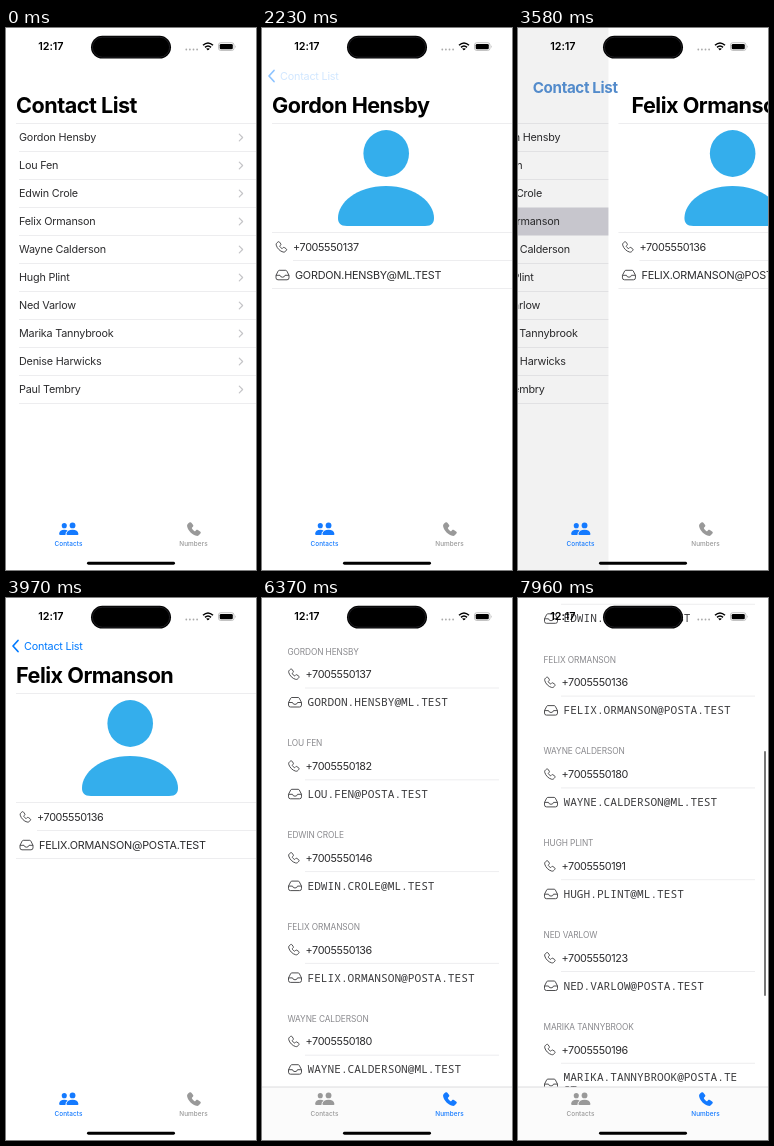
These frames come from a looping animation (250 by 542 pixels, 8 s). An HTML page:

```html
<!DOCTYPE html>
<html lang="en">
<head>
<meta charset="utf-8">
<title>Contacts</title>
<style>
  html, body { margin: 0; width: 100%; height: 100%; overflow: hidden; background: #fff; }
  svg { display: block; width: 100%; height: 100%; }
  text { font: 10.8px Inter, "Liberation Sans", sans-serif; letter-spacing: -.2px; fill: #2c2c2e; white-space: pre; }
  .large { font-size: 21.6px; font-weight: 700; letter-spacing: -.5px; fill: #000; }
  .phone { letter-spacing: -.35px; }
  .mono { font: 300 11.15px "Noto Sans Mono", "DejaVu Sans Mono", monospace; letter-spacing: 0; fill: #3c3c3e; }
  .head { font-size: 8.3px; letter-spacing: -.1px; fill: #8a8a8e; }
  .tab text { font-size: 6.4px; font-weight: 500; letter-spacing: .05px; text-anchor: middle; fill: inherit; }
  .clock { font-weight: 600; letter-spacing: -.1px; fill: #000; }
  .back { fill: #007aff; }
  .line { stroke: #e9e9eb; stroke-width: .8; }
  .icon { fill: none; stroke: #3c3c3e; stroke-width: .9; stroke-linejoin: round; }
  .arrow { fill: none; stroke-linecap: round; stroke-linejoin: round; }
</style>
</head>
<body>
<svg id="stage" viewBox="0 0 250 542"></svg>
<script>
const LOOP = 8000, STEP = 48.13, PITCH = 91.8, ROW = 28;
const BLUE = '#147aff', GRAY = '#999';

// name, last two digits of the phone number, mail domain
const contacts = [
  ['Gordon Hensby', 37, 'ML.TEST'], ['Lou Fen', 82, 'POSTA.TEST'],
  ['Edwin Crole', 46, 'ML.TEST'], ['Felix Ormanson', 36, 'POSTA.TEST'],
  ['Wayne Calderson', 80, 'ML.TEST'], ['Hugh Plint', 91, 'ML.TEST'],
  ['Ned Varlow', 23, 'POSTA.TEST'], ['Marika Tannybrook', 96, 'POSTA.TEST'],
  ['Denise Harwicks', 64, 'ML.TEST'], ['Paul Tembry', 58, 'ML.TEST']
].map(([name, end, domain]) => ({
  name,
  phone: '+70055501' + end,
  mail: name.toUpperCase().replace(' ', '.') + '@' + domain
}));

// times at which a row is tapped and its page moves in and out
const visits = [
  { row: 0, tap: 495, push: 592, press: 2225, pop: 2490 },
  { row: 3, tap: 3380, push: 3463, press: 4680, pop: 4990 }
];
const TAB_SWITCH = 6365, SCROLL_START = 7335, SCROLL_END = 7960;

const handset = 'M3.2.8C4 .1 4.9.3 5.4 1.1L6.9 3.3C7.3 4 7.2 4.5 6.7 5L5.9 5.8C5.5 6.2 5.6 6.5 5.9 7C6.4 7.7 7.3 8.6 8 9.1C8.5 9.4 8.8 9.5 9.2 9.1L10 8.3C10.5 7.8 11 7.7 11.7 8.1L13.9 9.6C14.7 10.1 14.9 11 14.2 11.8C13.2 13.2 12 14.6 10 14C6 13 2 9 1 5C.4 3 1.8 1.8 3.2.8Z';
const tray = 'M0 5.5L2.2 1.2Q2.6.5 3.4.5H9.6Q10.4.5 10.8 1.2L13 5.5V8Q13 10 11 10H2Q0 10 0 8ZH4Q4.4 7.4 6.5 7.4T9 5.5H13';

const text = (x, y, s, cls = '', id = '') => `<text x="${x}" y="${y}" class="${cls}" id="${id}">${s}</text>`;
const line = (x, y, end = 250) => `<path class="line" d="M${x} ${y}H${end}"/>`;
const phoneIcon = (x, y) =>
  `<path class="icon" style="stroke-width:1.2" transform="translate(${x} ${y - 5.6}) scale(.76)" d="${handset}"/>`;
const trayIcon = (x, y) => `<path class="icon" transform="translate(${x} ${y - 5.2})" d="${tray}"/>`;

const listRow = ({ name }, i) => {
  const y = 109.5 + ROW * i;
  return text(13, y + 3.9, name) + line(13, y + 14) +
    `<path class="arrow" stroke="#c4c4c7" stroke-width="1.2" d="M233.3 ${y - 3.3}l3.3 3.3-3.3 3.3"/>`;
};

const section = ({ name, phone, mail }, i) => {
  const wrapped = mail.length > 26;
  return `<g transform="translate(0 ${PITCH * i})">` +
    text(25.5, 56.5, name.toUpperCase(), 'head') +
    phoneIcon(26, 76.3) + text(43.5, 80.3, phone, 'phone') +
    line(43, 90, 237) +
    trayIcon(26.5, wrapped ? 110.5 : 104.2) +
    text(45.5, 108.2, mail.slice(0, 26), 'mono') +
    (wrapped ? text(45.5, 121.2, mail.slice(26), 'mono') : '') + '</g>';
};

stage.innerHTML = `
  <g id="list">
    <rect width="250" height="542" fill="#fff"/>
    <rect id="highlight" y="95.5" width="250" height="28" fill="#d2d1d8"/>
    ${line(10, 95.5)}${contacts.map(listRow).join('')}
    <rect id="dim" width="250" height="542" fill="#001"/>
  </g>
  <g id="detail">
    <rect width="250" height="542" fill="#fff"/>
    ${line(10, 95.5)}${line(10, 204.5)}${line(31, 232.5)}${line(10, 260.5)}
    <g fill="#34aeec">
      <ellipse cx="124.2" cy="125.5" rx="22.8" ry="23.4"/>
      <path d="M85 198C78 198 76 194.5 76 190C76 175 94 158 124 158S172 175 172 190C172 194.5 170 198 163 198Z"/>
    </g>
    ${phoneIcon(13.5, 219)}${text(31, 223, '', 'phone', 'phone')}
    ${trayIcon(14, 247)}${text(33, 251, '', '', 'mail')}
  </g>
  <g id="nav">
    ${text(0, 0, 'Contact List', 'large', 'listTitle')}
    ${text(0, 0, 'Contact List', 'back', 'backLabel')}
    <path id="backArrow" class="arrow" stroke="#007aff" stroke-width="1.7" d="M12 42.5l-5 5.5 5 5.5"/>
    ${text(0, 84.8, '', 'large', 'detailTitle')}
  </g>
  <g id="numbers">
    <rect width="250" height="542" fill="#fff"/>
    <g id="sections">${contacts.map(section).join('')}</g>
    <rect id="scrollbar" x="246" width="2" height="245" rx="1" fill="#777"/>
    <rect y="489" width="250" height="53" fill="#fbfbfb"/>
    <path d="M0 489H250" stroke="#d4d4d6" stroke-width=".8"/>
  </g>
  <g class="tab" id="contactsTab">
    <g transform="translate(62.7 501.2) scale(.94) translate(-62.7 -501.2)">
      <circle cx="58" cy="497.4" r="2.7"/><circle cx="66.8" cy="497.2" r="3.1"/>
      <path d="M53.8 507.5Q52.5 507.5 52.5 506Q53 501.8 58 501.8Q60.2 501.8 61.5 502.7Q59 504.5 59.2 507.5Z"/>
      <path d="M61.5 507.5Q60.2 507.5 60.3 506Q61.2 501.8 66.8 501.8T73 506Q73.2 507.5 72 507.5Z"/>
    </g>
    ${text(62.5, 517.8, 'Contacts')}
  </g>
  <g class="tab" id="numbersTab">
    <path transform="translate(180.2 493.8)" d="${handset}"/>
    ${text(187.5, 517.8, 'Numbers')}
  </g>
  <rect x="81" y="533.8" width="88" height="2.9" rx="1.45"/>
  ${text(32.3, 22.4, '12:17', 'clock')}
  <rect x="85" y="7.8" width="80" height="22.8" rx="11.4"/>
  <rect x="86.4" y="9.2" width="77.2" height="20" rx="10" fill="none" stroke="#2c2c32" stroke-width=".7"/>
  <path d="M180.3 21.5H192" stroke="#aaa" stroke-width="1.8" stroke-linecap="round" stroke-dasharray="0 3.6"/>
  <g fill="none" stroke="#000" stroke-width="1.5">
    <path d="M197 17.3Q202 12.7 207 17.3M199 19.4Q202 16.7 205 19.4"/>
    <path d="M200.7 20.8h2.6l-1.3 1.3z" stroke-width=".8" fill="#000"/>
  </g>
  <rect x="212.5" y="14.7" width="15.5" height="7.8" rx="2.3" fill="none" stroke="#aaa" stroke-width=".7"/>
  <rect x="213.7" y="15.9" width="13.1" height="5.4" rx="1.3"/>
  <path d="M229 17.2q1.3 1.4 0 2.8z" fill="#aaa"/>`;

const el = id => document.getElementById(id);
const clamp = v => Math.min(1, Math.max(0, v));
const set = (id, attrs) => Object.entries(attrs).forEach(([k, v]) => el(id).setAttribute(k, v));
const show = (id, on) => { el(id).style.display = on ? '' : 'none'; };

// critically damped spring, time in ms
const spring = ms => {
  if (ms <= 0) return 0;
  if (ms > 495) return 1;
  const w = .0185 * ms;
  return 1 - (1 + w) * Math.exp(-w);
};

function drawNavigation(t) {
  const visit = visits.findLast(v => t >= v.tap) || visits[0];
  const { name, phone, mail } = contacts[visit.row];
  const popping = t >= visit.pop, pressed = t >= visit.press;
  const p = spring(t - visit.push) - spring(t - visit.pop);
  const edge = 250 * (1 - p);

  set('list', { transform: `translate(${-75 * p} 0)` });
  set('dim', { opacity: .08 * p });
  set('highlight', {
    y: 95.5 + ROW * visit.row,
    opacity: t < visit.tap ? 0 : 1 - spring(t - visit.pop)
  });

  show('detail', p > 0);
  set('detail', { transform: `translate(${edge} 0)` });
  el('phone').textContent = phone;
  el('mail').textContent = mail;
  el('detailTitle').textContent = name;
  set('detailTitle', {
    x: 10 + edge * (popping ? .706 : 1.143),
    opacity: popping ? clamp(2 * p) : +(p > 0)
  });

  // the large list title shrinks into the back label
  const q = p ** (popping ? .9 : 1.15), scale = 1 - q / 2;
  const place = `translate(${10 + 8 * q} ${84.8 - 32.9 * q})`;
  const bold = clamp((.88 - p) / .2);
  set('listTitle', { transform: `${place} scale(${scale})`, opacity: bold });
  el('listTitle').style.fill = `rgb(${130 * p}, ${218 * p}, ${Math.min(255, 318 * p)})`;
  set('backLabel', {
    transform: `${place} scale(${scale * 2})`,
    opacity: (1 - bold) * (popping ? .33 : pressed ? .18 : 1)
  });
  set('backArrow', { opacity: popping ? 0 : clamp((p - .7) / .3) * (pressed ? .45 : 1) });
}

function drawNumbers(t) {
  const u = clamp((t - SCROLL_START) / (SCROLL_END - SCROLL_START));
  const scroll = 267.3 * (u + u * u * (3 - 2 * u)) / 2;
  set('sections', { transform: `translate(0 ${-scroll})` });
  set('scrollbar', { y: 47 + .397 * scroll, opacity: clamp(u * 8) });
}

function draw(time) {
  // the motion advances in steps of a fixed length
  const t = Math.floor((time - 12.7) / STEP) * STEP + 18.7;
  const onNumbers = t >= TAB_SWITCH;
  show('numbers', onNumbers);
  show('nav', !onNumbers);
  set('contactsTab', { fill: onNumbers ? GRAY : BLUE });
  set('numbersTab', { fill: onNumbers ? BLUE : GRAY });
  drawNavigation(t);
  drawNumbers(t);
}

const start = performance.now();
function tick() {
  draw((performance.now() - start) % LOOP);
  requestAnimationFrame(tick);
}
tick();
</script>
</body>
</html>
```
